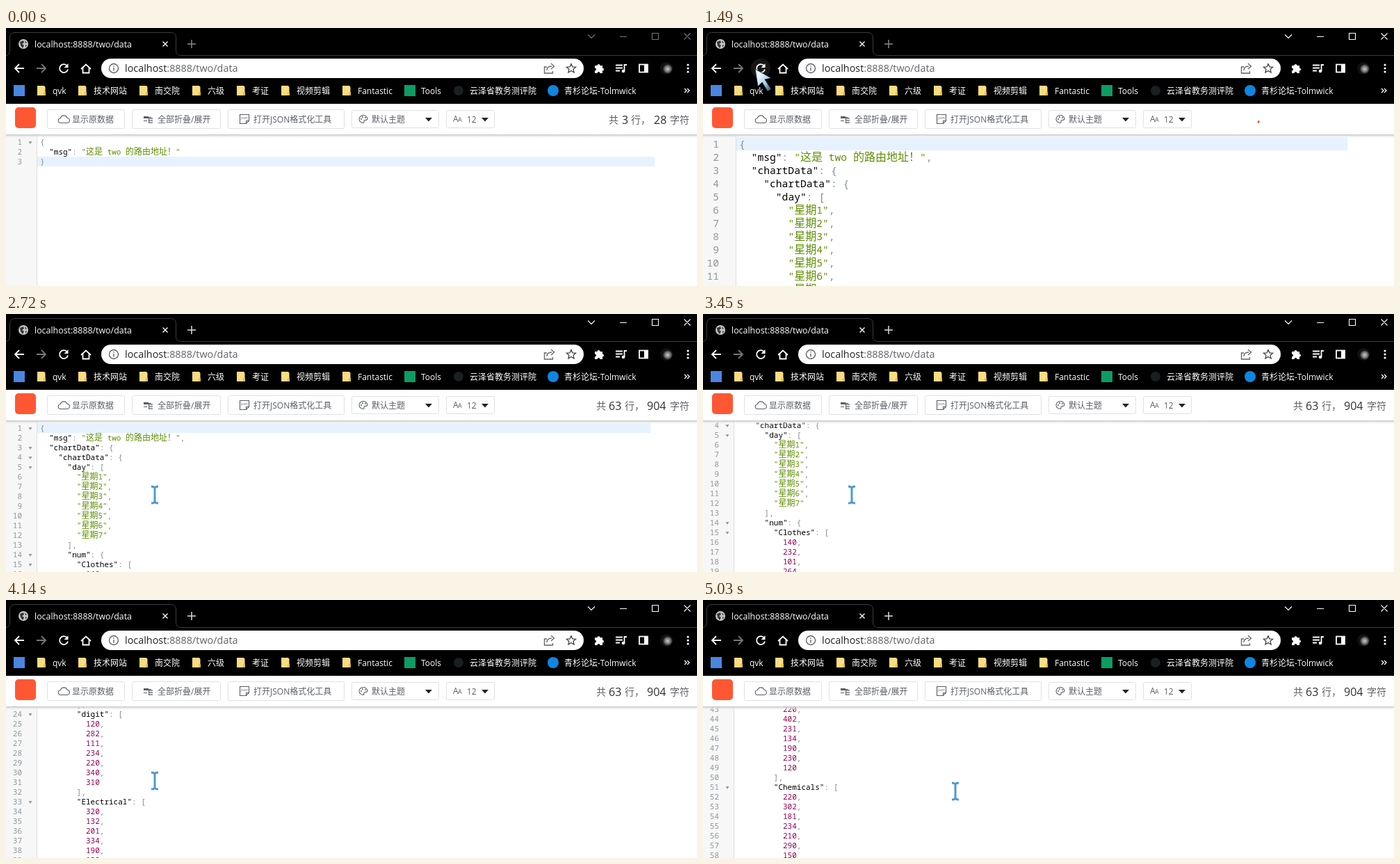
An HTML page that plays this animation: 994 px wide and 371 px high, repeating every 5.09 s.

```html
<!DOCTYPE html>
<html lang="zh">
<head>
<meta charset="utf-8">
<title>JSON route</title>
<style>
html, body { margin: 0; width: 100%; height: 100%; overflow: hidden; background: #fff; }
svg { display: block; }
text { white-space: pre; font-family: "Open Sans", "Noto Sans CJK SC", "Noto Sans CJK", sans-serif; font-size: 12px; }
.code text { font-family: "Noto Sans Mono", "Noto Sans CJK SC", "Noto Sans CJK", monospace; font-size: inherit; }
.line { fill: none; stroke-width: 1.8; }
.key { fill: #000; } .str { fill: #5d8f00; } .num { fill: #905; } .pun { fill: #7d8c96; }
</style>
</head>
<body>
<svg id="stage" width="994" height="371" viewBox="0 0 994 371"></svg>
<script>
const LOOP = 5090;
const msg = "这是 two 的路由地址！";
const before = { msg };
const after = {
  msg,
  chartData: { chartData: {
    day: [1, 2, 3, 4, 5, 6, 7].map(d => "星期" + d),
    num: {
      Clothes: [140, 232, 101, 264, 90, 340, 250],
      digit: [120, 282, 111, 234, 220, 340, 310],
      Electrical: [320, 132, 201, 334, 190, 130, 220],
      gear: [220, 402, 231, 134, 190, 230, 120],
      Chemicals: [220, 302, 181, 234, 210, 290, 150]
    }
  } }
};

// SVG helpers
const text = (x, y, s, fill, more = "") => `<text x="${x}" y="${y}" fill="${fill}" ${more}>${s}</text>`;
const rect = (x, y, w, h, fill, more = "") => `<rect x="${x}" y="${y}" width="${w}" height="${h}" fill="${fill}" ${more}/>`;
const disc = (x, y, r, fill, more = "") => `<circle cx="${x}" cy="${y}" r="${r}" fill="${fill}" ${more}/>`;
const line = (d, color, more = "") => `<path class="line" d="${d}" stroke="${color}" ${more}/>`;
const shape = (d, fill, more = "") => `<path d="${d}" fill="${fill}" ${more}/>`;
const group = (id, body, more = "") => `<g id="${id}" ${more}>${body}</g>`;
const thin = 'style="stroke-width:1.1"';

function paint(src, size) {
  return src.replace(/"[^"]*"|\d+|[{}[\],:]+/g, (m, at) => {
    const kind = m[0] === '"' ? (src[at + m.length] === ":" ? "key" : "str") : /\d/.test(m) ? "num" : "pun";
    const body = m.replace(/[^\x00-\x7f]+/g, c => `<tspan font-size="${size}">${c}</tspan>`);
    return `<tspan class="${kind}">${body}</tspan>`;
  });
}

// Code view: size is the width of a CJK character
function editor(id, data, { size, pitch, left, gutter, active, end, folds }) {
  const char = size * 0.55;
  let out = rect(0, 100, gutter, 1000, "#f7f7f7") + rect(gutter - 1, 100, 1, 1000, "#ddd")
    + rect(gutter, 157 + active * pitch, end - gutter, pitch, "#e6f2ff");
  JSON.stringify(data, null, 2).split("\n").forEach((row, i) => {
    const src = row.trim(), y = 157 + i * pitch + pitch * 0.78;
    out += text(23, y, i + 1, "#8f979c", 'text-anchor="end"')
      + text(left + (row.length - src.length) * char, y, paint(src, size), "#999");
    if (folds && /[{[]$/.test(src)) out += shape(`M32.5 ${y - 5}h5l-2.5 4z`, "#999");
  });
  return group(id, out, `class="code" font-size="${char / 0.6}"`);
}

function counter(id, rows, chars, x) {
  const gray = (x, s) => text(x, 137, s, "#606266", 'style="font-size:14px"');
  const dark = (x, s) => text(x, 138, s, "#303133", 'style="font-size:16px"');
  return group(id, gray(x[0], "共") + dark(x[1], rows) + gray(x[2], "行，") + dark(x[3], chars) + gray(955, "字符"));
}

function header() {
  const ink = "#5a5e66";
  const boxes = [[59, 112], [181, 128], [319, 168], [497, 126], [633, 70]];
  const labels = [[95, "显示原数据"], [218, "全部折叠/展开"], [356, "打开JSON格式化工具"], [526, "默认主题"], [663, "12"]];
  return rect(0, 153, 994, 6, "url(#shade)") + rect(0, 108, 994, 45, "#fff")
    + rect(13, 114, 30, 30, "#ff5733", 'rx="5"')
    + boxes.map(([x, w], i) => rect(x + .5, i > 2 ? 118.5 : 117.5, w - 1, i > 2 ? 25 : 27, "#fff", 'rx="2" stroke="#dfe1e6"')).join("")
    + labels.map(([x, s]) => text(x, 135.5, s, ink)).join("")
    + [608, 689].map(x => shape(`M${x - 5} 129h10l-5 5.5z`, "#222")).join("")
    + line("M79 136.500a3.500 3.500 0 0 1-.5-7a5 5 0 0 1 9.500-.3a3.700 3.700 0 0 1 .5 7.300z", ink, thin)
    + shape("M198 127h7v3h-7zM205 128h4v1h-4zM198 133h5v1h-5zM206 129.500h5v1.300h-5zM206 132.500h5v1.300h-5zM206 135.500h5v1.300h-5zM205 129h1v8h-1z", ink)
    + line("M336.500 124.500h13v9l-4 4h-9zM349.500 133.500h-4v4", ink, thin) + text(338, 131, "json", ink, 'style="font-size:5px"')
    + line("M514 136.500a6 5.500 0 1 1 6-6c0 3-4 1-5 3c-.6 1.500 1 2.500-1 3z", ink, thin)
    + [[511, 131], [513, 128], [517, 129]].map(p => disc(...p, 1, ink)).join("")
    + text(643, 135, "A", ink) + text(650, 135, "A", ink, 'style="font-size:9px"');
}

function tabs() {
  return rect(0, 0, 994, 109, "#000")
    + line("M0 39.500Q5.500 39 5.500 32V14Q5.500 6.500 13 6.500H237Q244.500 6.500 244.500 14V32Q244.500 39.500 252 39.500H994", "#3c3c3c", 'style="stroke-width:1"')
    + disc(25, 23, 7, "#c4c7ca") + shape("M20 20l5-2l1 3l-3 2l3 2l-2 4l-3-4zM27 18l3 3l-2 1zM28 24l2 1l-2 3z", "#333")
    + text(41, 27.5, "localhost:8888/two/data", "#fff", 'style="font-size:12.4px"')
    + line("M225.500 19.500l7 7m0-7l-7 7", "#eee", 'style="stroke-width:1.5"')
    + group("plus", line("M261 23h12m-6-6v12", "currentColor", 'style="stroke-width:1.5"'))
    + group("controls", line("M837 9.500l5 5l5-5M883 12.500h10M929.500 7.500h9v9h-9zM975.500 7.500l9 9m0-9l-9 9", "currentColor", thin));
}

function toolbar() {
  const w = "#fff", g = "#5f6368";
  return line("M26 58H13m6-6l-6 6l6 6", w) + line("M44 58h13m-6-6l6 6l-6 6", "#777")
    + disc(83, 58, 14, "#161616", 'id="hover"')
    + line("M88 54.500a6 6 0 1 0 1 5", w) + shape("M89.500 51v6h-6z", w)
    + line("M108 59l7-6.500l7 6.500M110.500 57v7.500h9v-7.500", w)
    + rect(137, 44, 694, 28, w, 'rx="14"')
    + line("M161.500 58a6.500 6.500 0 1 1-13 0a6.500 6.500 0 0 1 13 0M155 57v4.500M155 54v1.500", g, 'style="stroke-width:1.4"')
    + text(171, 63, `localhost<tspan fill="${g}">:8888/two/data</tspan>`, "#202124", 'style="font-size:14.4px"')
    + line("M778 56h-3.500v9h12v-3M778 61c0-4 3-6 7-6m-1-4l4.500 4l-4.500 4", g, 'style="stroke-width:1.3"')
    + line("M813 51.500l1.900 4.300l4.700.4l-3.500 3.100l1 4.600l-4.100-2.400l-4.100 2.400l1-4.600l-3.500-3.100l4.700-.4z", "#444", 'style="stroke-width:1.300"')
    + shape("M847 54h3.500a2 2 0 1 1 4 0h3.500v3.500a2 2 0 1 1 0 4v3.500h-3.500a2 2 0 0 0-4 0h-3.500v-3.500a2 2 0 0 0 0-4z", w)
    + line("M877 53.500h10M877 57.500h10M877 61.500h6M889.500 62v-9h3.500", w) + disc(888, 62, 2.300, w)
    + rect(911, 52.5, 12, 11, "none", 'stroke="#fff" stroke-width="1.8"') + rect(918, 53, 5, 10, w)
    + disc(950, 58, 9, "url(#photo)")
    + [53, 58, 63].map(y => disc(981, y, 1.6, w)).join("");
}

function bookmarks() {
  const folders = [[45, "qvk"], [104, "技术网站"], [192, "南交院"], [268, "六级"], [332, "考证"], [396, "视频剪辑"], [484, "Fantastic"]];
  const links = [[597, "Tools"], [667, "云泽省教务测评院"], [803, "青杉论坛-Tolmwick"]];
  return rect(11, 82, 16, 16, "#4a86e0")
    + folders.map(([x, s]) => shape(`M${x} 83h10l1.500 2v12h-11.500z`, "#fbdc83") + rect(x + 9, 92, 3, 5, "#e9bd52") + text(x + 22, 94.5, s, "#fff")).join("")
    + rect(573, 82, 16, 16, "#0d9c62") + disc(651, 90, 7, "#1a1f21") + disc(787, 90, 8, "#0f86e0")
    + links.map(([x, s]) => text(x, 94.5, s, "#fff")).join("")
    + line("M976 87l3 3l-3 3M980 87l3 3l-3 3", "#fff", 'style="stroke-width:1.300"');
}

const small = { size: 12, pitch: 14, left: 49, gutter: 45, folds: true };
const stage = document.getElementById("stage");
stage.innerHTML = `<defs>
<linearGradient id="shade" x2="0" y2="1"><stop stop-color="#c4c4c4"/><stop offset="1" stop-color="#fff" stop-opacity="0"/></linearGradient>
<radialGradient id="photo" cx=".6" cy=".55"><stop stop-color="#ccc"/><stop offset=".45" stop-color="#777"/><stop offset=".8" stop-color="#111"/></radialGradient>
<linearGradient id="ice" x2="1" y2="1"><stop offset=".3" stop-color="#eaf6fc"/><stop offset=".65" stop-color="#a9cbe0"/><stop offset="1" stop-color="#28455c"/></linearGradient>
</defs>`
  + editor("first", before, { ...small, active: 2, end: 933 })
  + editor("large", after, { size: 16, pitch: 19, left: 52, gutter: 48, active: 0, end: 927 })
  + editor("full", after, { ...small, active: 0, end: 927 })
  + group("header", header())
  + counter("countA", 3, 28, [867, 886, 899, 932])
  + counter("countB", 63, 904, [849, 867, 890, 922])
  + group("spinner", shape("M797.500 136.500l1-3.500l2.500.5l-1.500 3.500z", "#f4511e"))
  + tabs() + toolbar() + bookmarks()
  + group("arrow", shape("M0 0L23 13L14 15L23 29L18 32L10 19L4 25Z", "url(#ice)", 'stroke="#16324a" stroke-linejoin="round"'))
  + group("beam", line("M-5-12Q0-12 0-9Q0-12 5-12M0-9V9M-5 12Q0 12 0 9Q0 12 5 12", "#4d9ad3", 'style="stroke-width:3"'));

// Bursts of screen updates: start, end, number of steps
const bursts = [[120, 390, 4], [560, 1030, 7], [1100, 1620, 8], [1700, 2200, 8], [2260, 2720, 8], [3450, 3940, 8], [4140, 4630, 8], [4950, 5030, 2]];
const pointer = [[120, 524, 338], [210, 400, 235], [300, 250, 125], [390, 145, 67], [560, 120, 64], [716, 75, 59], [2194, 75, 59], [2720, 214, 260], [4870, 214, 260], [5030, 363, 275]];
const scroll = [[3380, 0], [3660, 183], [3940, 308], [4140, 322], [4630, 595]];

function snap(t) {
  let last = 0;
  for (const [a, b, n] of bursts) {
    const step = (b - a) / (n - 1);
    if (t >= a) last = a + step * Math.min(n - 1, Math.floor((t - a) / step + 0.2));
  }
  return last;
}

function at(keys, t, col) {
  const i = keys.findIndex(k => k[0] > t);
  if (i < 0) return keys[keys.length - 1][col];
  if (i === 0) return keys[0][col];
  const p = keys[i - 1], q = keys[i];
  return p[col] + (q[col] - p[col]) * (t - p[0]) / (q[0] - p[0]);
}

const el = id => document.getElementById(id);
const show = (id, on) => { el(id).style.display = on ? "" : "none"; };

function draw(now) {
  const t = snap(now % LOOP);
  const x = at(pointer, t, 1), y = at(pointer, t, 2);
  const old = t < 1170, loaded = t >= 1320, settled = t >= 1840;
  show("first", old);
  show("large", loaded && !settled);
  show("full", settled);
  show("header", old || loaded);
  show("countA", old);
  show("countB", settled);
  show("spinner", loaded && t < 2260);
  show("arrow", t >= 120 && y < 153);
  show("beam", t >= 120 && y >= 153);
  show("hover", t >= 120 && Math.hypot(x - 83, y - 58) < 14);
  el("plus").style.color = settled ? "#ddd" : "#888";
  el("controls").style.color = t >= 1100 ? "#fff" : "#777";
  el("full").setAttribute("transform", `translate(0 ${-Math.round(at(scroll, t, 1))})`);
  for (const id of ["arrow", "beam"]) el(id).setAttribute("transform", `translate(${x} ${y})`);
}

const start = performance.now();
(function tick() {
  draw(performance.now() - start);
  requestAnimationFrame(tick);
})();
</script>
</body>
</html>
```
